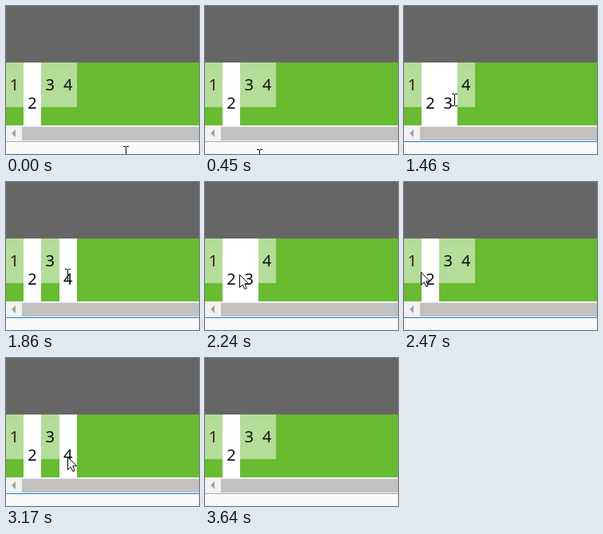
Animation, 242 px wide and 186 px high, one loop 3730 ms. Source, as an HTML page with a canvas:

```html
<!DOCTYPE html>
<html lang="en">
<head>
<meta charset="utf-8">
<title>Hover menu</title>
<style>
html, body { margin: 0; width: 100%; height: 100%; overflow: hidden; }
canvas { display: block; width: 242px; height: 186px; }
</style>
</head>
<body>
<canvas id="stage" width="242" height="186"></canvas>
<script>
const ctx = document.getElementById('stage').getContext('2d');
const LOOP = 3730;
const EDGES = [0, 22, 44, 67, 89];
const ACTIVE = 2;

// [start ms, pointer kind, x, y, hovered item]
const STEPS = [
  [0, 'beam', 150, 184],
  [70, 'arrow', 136, 163],
  [150, 'beam', 114, 182],
  [220, 'none'],
  [450, 'beam', 68, 188],
  [530, 'arrow', 63, 164],
  [610, 'arrow', 52, 143],
  [690, 'arrow', 38, 128],
  [770, 'arrow', 21, 119, 1],
  [840, 'arrow', 16, 117, 1],
  [1310, 'arrow', 27, 117],
  [1380, 'arrow', 45, 117, 3],
  [1460, 'beam', 63, 118, 3],
  [1530, 'arrow', 72, 117, 4],
  [1610, 'beam', 79, 117, 4],
  [1860, 'beam', 77, 117, 4],
  [1940, 'arrow', 71, 117, 4],
  [2020, 'arrow', 65, 117, 3],
  [2090, 'beam', 58, 117, 3],
  [2160, 'beam', 52, 117, 3],
  [2240, 'arrow', 43, 116, 3],
  [2320, 'beam', 32, 117],
  [2390, 'beam', 27, 117],
  [2470, 'arrow', 21, 113],
  [2700, 'arrow', 36, 114],
  [2780, 'beam', 55, 117, 3],
  [2850, 'arrow', 68, 115, 3],
  [2930, 'beam', 77, 117, 4],
  [3100, 'arrow', 77, 124, 4],
  [3180, 'arrow', 84, 140],
  [3260, 'arrow', 92, 160],
  [3340, 'none']
];

const arrowPath = new Path2D('M.5 .5V16.5L4.2 13L6.8 18.5L9.2 17.5L6.8 11.8H11.5Z');

function box(color, x, y, w, h) {
  ctx.fillStyle = color;
  ctx.fillRect(x, y, w, h);
}

function drawMenu(hot) {
  ctx.font = '20px "Open Sans", "Noto Sans", sans-serif';
  ctx.textAlign = 'center';
  for (let n = 1; n <= 4; n++) {
    const x = EDGES[n - 1], w = EDGES[n] - x;
    const open = n === ACTIVE || n === hot;
    box(open ? '#fff' : '#b3dd98', x, 71, w, open ? 79 : 56);
    ctx.fillStyle = n === 1 ? '#300800' : '#000';
    ctx.fillText(n, 10.5 + (n - 1) * 22.4, open ? 129 : 106);
  }
}

function drawScrollbar(hover) {
  box('#f1f1f1', 0, 150, 242, 20);
  box(hover ? '#a8a8a8' : '#c1c1c1', 20, 152, 222, 17);
  ctx.fillStyle = '#a3a3a3';
  ctx.beginPath();
  ctx.moveTo(7, 160);
  ctx.lineTo(12, 155);
  ctx.lineTo(12, 165);
  ctx.fill();
}

function drawArrow(x, y) {
  ctx.save();
  ctx.translate(x, y);
  ctx.fillStyle = '#fff';
  ctx.strokeStyle = '#000';
  ctx.lineWidth = 1;
  ctx.fill(arrowPath);
  ctx.stroke(arrowPath);
  ctx.restore();
}

function drawBeam(x, y) {
  for (const edge of [y - 8, y + 7]) {
    box('#000', x - 3, edge, 3, 1);
    box('#000', x + 1, edge, 3, 1);
  }
  box('#000', x, y - 7, 1, 14);
}

function draw(t) {
  const [, kind, x, y, hot] = STEPS.findLast(step => step[0] <= t);
  const focused = t >= 1080 && t < 3640;

  box('#666', 0, 0, 242, 71);
  box('#68bb31', 0, 71, 242, 79);
  drawMenu(hot);
  drawScrollbar(kind === 'arrow' && y >= 152);
  box(focused ? '#1883d7' : '#aaa', 0, 170, 242, 1);
  box('#f9f9f9', 0, 171, 242, 15);
  if (kind === 'arrow') drawArrow(x, y);
  if (kind === 'beam') drawBeam(x, y);
}

const start = performance.now();
function tick() {
  draw((performance.now() - start) % LOOP);
  requestAnimationFrame(tick);
}
tick();
</script>
</body>
</html>
```
